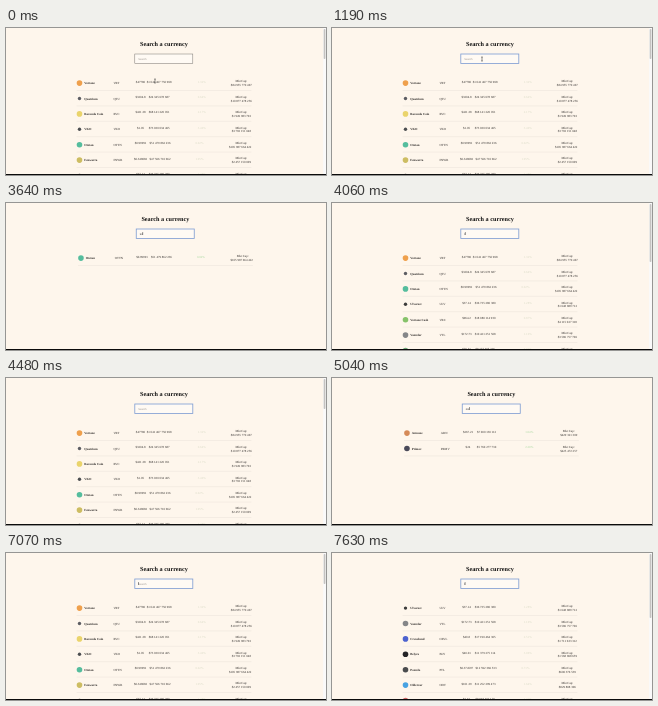
Animation, 320 px wide and 147 px high, one loop 8 s. Source, as an HTML page:

```html
<!DOCTYPE html>
<html lang="en">
<head>
<meta charset="utf-8">
<title>Search a currency</title>
<style>
  html, body { margin: 0; width: 100%; height: 100%; overflow: hidden; background: #fef6ec; }
  svg { display: block; width: 100vw; height: 100vh; }
  text { font: 3.1px "Liberation Serif", serif; fill: #2a2725; text-rendering: geometricPrecision; }
  .title { font-size: 6.2px; font-weight: bold; fill: #111; }
  .name { font-weight: bold; }
  .mid { text-anchor: middle; }
  .field { font: 2.65px "Liberation Sans", sans-serif; fill: #333; }
  .field.hint { fill: #9a9590; }
  .line { stroke: #e8e1d9; stroke-width: .5; }
</style>
</head>
<body>
<svg viewBox="0 0 320 147" preserveAspectRatio="none">
  <g id="page">
    <text class="title mid" x="157.9" y="18.2">Search a currency</text>
    <rect id="box" x="128.8" y="26" width="58" height="9.4"/>
    <text id="typed" class="field" x="132.2" y="31.6"></text>
    <rect id="caret" y="29.1" width=".5" height="2.9" fill="#222"/>
    <g id="rows"></g>
  </g>
  <g id="bar">
    <rect x="317.1" width="2.9" height="147" fill="#fafafa"/>
    <rect id="thumb" x="317.7" y="1" width="1.7" rx=".8" fill="#c4c2c0"/>
  </g>
  <rect y="146" width="320" height="1" fill="#0b0b0b"/>
  <path id="pointer" d="M-.8-2h1.6M0-2v4M-.8 2h1.6" stroke="#222" stroke-width=".5" fill="none"/>
</svg>
<script>
const LOOP = 8000, ROW_H = 15.4, SHIFT = 1.45;
const $ = id => document.getElementById(id);

// name | ticker | price | volume | change | market cap | icon colour
const coins = `
Vortane|VRT|$47780|$1 041 467 750 968|1.32%|$84 955 770 467|#efa04c
Quatrium|QTU|$3204.8|$24 345 678 687|0.64%|$10 877 478 256|#5c5d63
Ravonda Coin|RVC|$421.38|$68 141 220 051|2.17%|$1 949 983 792|#ead46c
VKO|VKO|$1.05|$73 030 034 465|3.40%|$3 792 151 048|#4b4d50
Otetan|OTTN|$0.99991|$51 479 862 236|0.02%|$105 987 664 422|#55bd9d
Fenwarra|FNWR|$0.348082|$47 566 710 662|1.95%|$2 457 150 009|#cdbd62
Ulvarost|ULV|$37.14|$36 735 280 380|1.28%|$1 648 889 712|#3b3b3b
Vortane Cash|VRC|$964.2|$18 080 114 930|0.87%|$4 115 027 318|#86c26a
Vantelor|VTL|$172.73|$10 421 251 508|1.10%|$3 586 757 706|#858688
Cravelund|CRVL|$40.8|$17 190 464 305|2.51%|$1 711 633 312|#4c62cf
Quatrium Era|QTE|$70.31|$8 177 305 226|0.93%|$3 016 480 755|#6fa878
Belyra|BLY|$40.01|$11 379 275 114|3.06%|$1 568 868 659|#242426
Pontelo|PTL|$0.374597|$12 592 366 533|0.71%|$600 376 539|#4a4c4e
Oldervar|ODV|$101.39|$11 252 299 473|1.64%|$829 808 306|#48a2e2
Merovik|MRV|$1.42|$9 026 718 440|0.58%|$940 117 206|#7b6bd0
Alvend|ALV|$2.61|$8 948 402 170|1.37%|$771 035 482|#d06a6a
Ratev|RTEV|$34.35|$8 666 669 685|-1.28%|$291 266 909|#2f4d60
Samdrin|SMD|$0.8814|$7 440 265 903|0.49%|$388 204 651|#59a9a6
Armone|ARN|$267.21|$7 000 130 112|1.04%|$429 321 309|#d58a58
Primov|PRMV|$24|$5 760 277 730|2.20%|$425 472 257|#4a4a59
Omprey|OMP|$3.77|$5 208 116 042|0.36%|$214 880 137|#c7a24f
Ostev|OSV|$5.08|$4 752 873 721|0.83%|$182 796 815|#9cb9d6`
  .trim().split("\n").map(line => line.split("|"));

// time, text in the field, caret on; null means not focused
const steps = [
  [0, null, 0], [630, "", 1], [1190, "", 0], [1680, "", 1], [1750, "t", 1], [1960, "te", 1],
  [2170, "tet", 1], [2240, "teta", 1], [2380, "tetan", 1], [2870, "tetan", 0],
  [3360, "tetan", 1], [3430, "teta", 1], [3640, "tet", 1], [3850, "te", 1],
  [4060, "t", 1], [4200, "", 1], [4480, "", 0], [4970, "m", 1], [5040, "mo", 1],
  [5250, "mon", 1], [5390, "mone", 1], [5950, "mone", 0], [6370, "mone", 1],
  [6440, "mon", 1], [6650, "mo", 1], [6860, "m", 1], [7000, "", 1], [7490, "", 0], [7630, "l", 1]
];
const thumbs = { "": 30, t: 58, m: 96, l: 64 };

const label = (cls, x, y, str, fill) =>
  `<text class="${cls}" x="${x}" y="${y}"${fill ? ` style="fill:${fill}"` : ""}>${str}</text>`;

function row([name, code, price, volume, change, cap, color], i, full) {
  const y = 55 + i * ROW_H;
  const long = price.length > 7;
  const tint = full ? "#d9dac6" : change[0] === "-" ? "#dd8078" : "#a3d79c";
  const r = ["Quatrium", "VKO", "Ulvarost"].includes(name) ? 1.7 : 2.8;
  return `<circle cx="73.5" cy="${y + .1}" r="${r}" fill="${color}"/>` +
    label("name", 78.3, y + 1.2, name) +
    label("", 107.4, y + 1.2, code) +
    label("mid", 134.5, y - .5, price) +
    label("mid", long ? 154 : 153.1, y - .5, volume) +
    label("mid", long ? 193.5 : 195.8, y - .5, change, tint) +
    label("mid", 235.3, y - .6, "Mkt Cap:") +
    label("mid", cap.length > 15 ? 234.2 : 235.3, y + 3.1, cap) +
    `<path class="line" d="M70.6 ${y + 7.5}H245.4"/>`;
}

function show([, text, caretOn]) {
  const query = text || "";
  const found = coins.filter(c => c[0].toLowerCase().includes(query));
  const full = found.length > 6;
  const focused = text !== null;
  $("page").setAttribute("transform", `translate(${full ? 0 : SHIFT} 0)`);
  $("bar").style.display = full ? "" : "none";
  $("thumb").setAttribute("height", thumbs[query] || 0);
  $("rows").innerHTML = found.slice(0, 7).map((c, i) => row(c, i, full)).join("");
  $("box").setAttribute("style", focused
    ? "fill:#fffaf4;stroke:#7c9cd2;stroke-width:.8"
    : "fill:#fffaf4;stroke:#77736f;stroke-width:.5");
  $("typed").textContent = query || "Search";
  $("typed").setAttribute("class", query ? "field" : "field hint");
  const end = query ? $("typed").getComputedTextLength() : 0;
  $("caret").setAttribute("x", 132.2 + end);
  $("caret").style.display = caretOn ? "" : "none";
}

let shown = null;
function draw(t) {
  const step = steps.findLast(s => s[0] <= t);
  if (step !== shown) show(shown = step);
  const k = Math.min(1, Math.max(0, (t - 70) / 350));
  const ease = k * k * (3 - 2 * k);
  $("pointer").setAttribute("transform", `translate(${149 + ease} ${53 - 22 * ease})`);
  $("pointer").style.display = t < 1680 ? "" : "none";
}

const start = performance.now();
function tick() {
  draw((performance.now() - start) % LOOP);
  requestAnimationFrame(tick);
}
tick();
</script>
</body>
</html>
```
